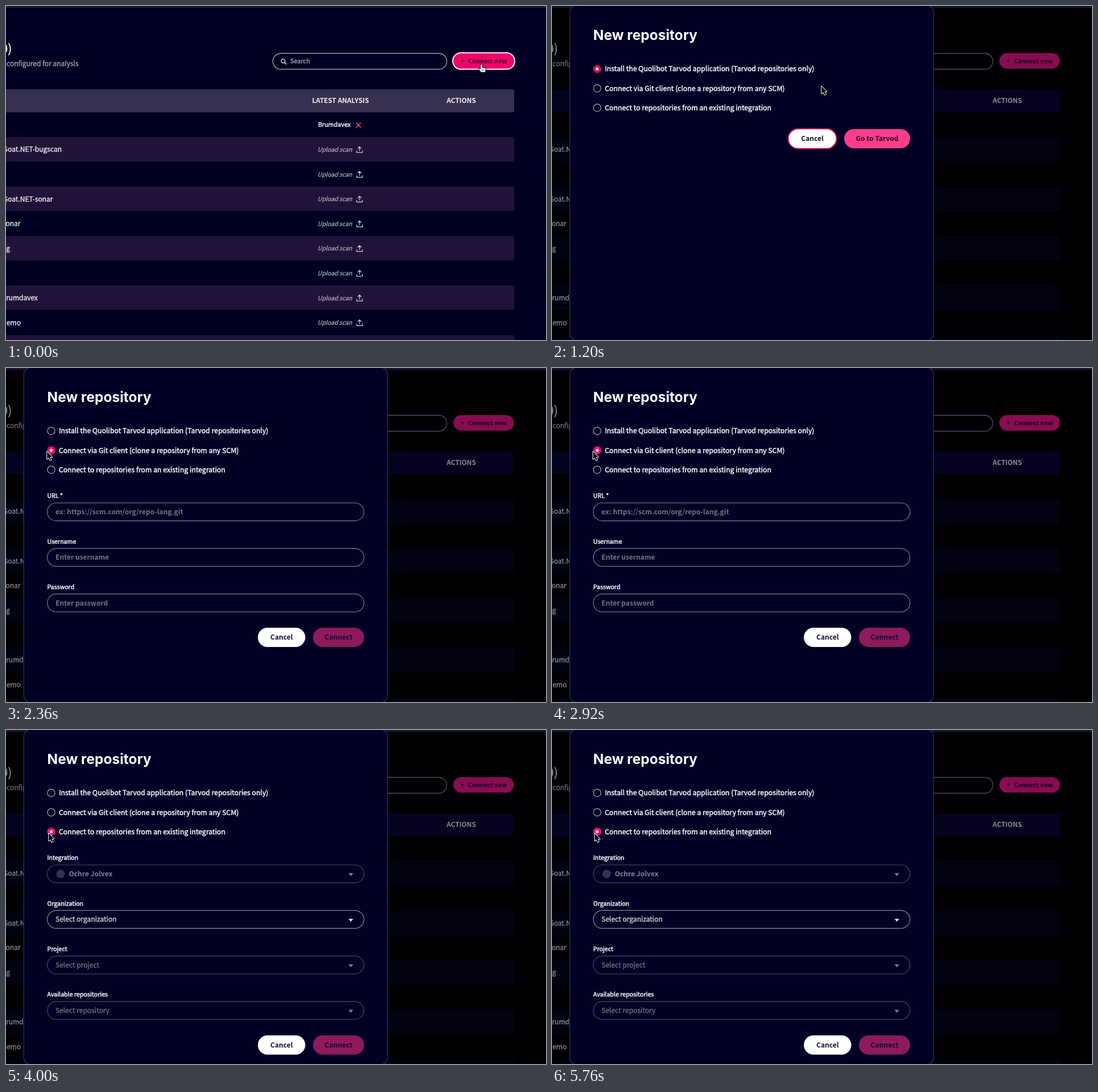
Write an HTML page with a canvas that moves like this. It is 950 px wide and 589 px high and loops after 6720 ms.

```html
<!DOCTYPE html>
<html lang="en">
<head>
<meta charset="utf-8">
<title>New repository</title>
<style>
html, body { margin: 0; width: 100%; height: 100%; overflow: hidden; background: #000023; }
canvas { display: block; width: 950px; height: 589px; }
</style>
</head>
<body>
<canvas id="stage" width="950" height="589"></canvas>
<script>
const ctx = document.getElementById('stage').getContext('2d');
const LOOP = 6720, STEP = 40;
const OPEN_AT = 280, GIT_AT = 2320, INTEGRATION_AT = 3840;
const SANS = '"Noto Sans CJK JP", "Noto Sans CJK SC", "Noto Sans CJK", "Open Sans", sans-serif';
const NAVY = '#010025';

const LIGHT = {
  bg: '#000023', strip: '#241638', header: '#383050', row: '#201239',
  title: '#f3f0f3', sub: '#aaa5ad', text: '#f0edf0', head: '#f5f2f5', field: '#a39c96'
};
const DIM = {
  bg: '#000002', strip: '#1d1233', header: '#04021e', row: '#020211',
  title: '#85838e', sub: '#6b6874', text: '#85838c', head: '#8d8b95', field: '#4d4a68'
};
const ROWS = [
  ['', 0], ['Goat.NET-bugscan', 98], ['', 0], ['Goat.NET-sonar', 82.5], ['sonar', 25.5],
  ['g', 7], ['', 0], ['Brumdavex', 56], ['demo', 26]
];
const OPTIONS = [
  'Install the Quolibot Tarvod application (Tarvod repositories only)',
  'Connect via Git client (clone a repository from any SCM)',
  'Connect to repositories from an existing integration'
];
// Pointer path: time, x, y
const PATH = [
  [560, 837, 102], [720, 775, 107], [960, 628, 126], [1200, 474, 141], [1440, 334, 149],
  [1680, 222, 154], [1920, 141, 157], [2160, 99, 156], [2320, 72, 147], [2960, 72, 147],
  [3200, 74, 147], [3560, 74, 147], [3680, 75, 163], [3800, 75, 182]
];

// y is the middle of the capital letters; a thin outline makes regular text a medium weight
function text(str, x, y, size, color, { weight = 400, align = 'left', style = '', family = SANS } = {}) {
  ctx.font = `${style} ${weight} ${size}px ${family}`;
  ctx.textAlign = align;
  ctx.fillStyle = ctx.strokeStyle = color;
  ctx.fillText(str, x, y + size * 0.365);
  if (weight < 600) {
    ctx.lineWidth = weight === 500 ? 0.5 : 0.35;
    ctx.lineJoin = 'round';
    ctx.strokeText(str, x, y + size * 0.365);
  }
}

function box(x, y, w, h, r, fill, stroke, lineWidth = 1.4) {
  ctx.beginPath();
  ctx.roundRect(x, y, w, h, r);
  paint(fill, stroke, lineWidth);
}

function disc(x, y, r, fill, stroke, lineWidth = 1.2) {
  ctx.beginPath();
  ctx.arc(x, y, r, 0, Math.PI * 2);
  paint(fill, stroke, lineWidth);
}

function paint(fill, stroke, lineWidth) {
  if (fill) { ctx.fillStyle = fill; ctx.fill(); }
  if (stroke) { ctx.strokeStyle = stroke; ctx.lineWidth = lineWidth; ctx.stroke(); }
}

function shape(d, x, y, fill, stroke, lineWidth = 1.2) {
  const path = new Path2D(d);
  ctx.save();
  ctx.translate(x, y);
  ctx.lineJoin = ctx.lineCap = 'round';
  if (stroke) { ctx.strokeStyle = stroke; ctx.lineWidth = lineWidth; ctx.stroke(path); }
  if (fill) { ctx.fillStyle = fill; ctx.fill(path); }
  ctx.restore();
}

function drawPage(c, open) {
  ctx.fillStyle = c.bg;
  ctx.fillRect(0, 0, 950, 589);
  ctx.fillStyle = c.strip;
  ctx.fillRect(0, 0, 950, 3.5);

  text('0)', 10.5, 75, 21.5, c.title, { align: 'right' });
  text('configured for analysis', 127.5, 102, 12, c.sub, { align: 'right' });

  box(469.5, 83.5, 306, 28, 14, null, c.field);
  disc(487.5, 97, 3.4, null, c.text);
  shape('M0 0L2.8 2.8', 490, 99.6, null, c.text, 1.4);
  text('Search', 500, 97.5, 10.9, c.sub);

  if (open) box(787, 83, 106.5, 27.5, 14, '#870c50');
  else box(786, 82.5, 109, 29, 14.5, '#f0046a', '#fff1f4', 2);
  const ink = open ? '#150222' : '#390025';
  text('+', 803, 97, 10.7, ink, { weight: 600, align: 'center' });
  text('Connect new', 813, 97, 10.7, ink, { weight: 600 });

  box(-10, 147, 904, 40.5, 4, c.header);
  text('LATEST ANALYSIS', 588.5, 167, 11.8, c.head, { weight: 600, align: 'center' });
  text('ACTIONS', 801, 167, 11.8, c.head, { weight: 600, align: 'center' });

  ROWS.forEach(([name, right], i) => {
    const y = 209.5 + i * 43.6;
    if (i % 2) box(-10, y - 21.8, 904, 43.2, 3, c.row);
    if (name) text(name, right, y, 12, c.text, { align: 'right' });
    if (i === 0) {
      text('Brumdavex', 549, y, 10.8, c.text, { weight: 500 });
      shape('M-4 -4L4 4M4 -4L-4 4', 620, 210.3, null, '#f2607c', 1.3);
    } else {
      text('Upload scan', 548, y, 10.6, '#aaa4ad', { style: 'italic' });
      shape('M0 1.8V-5.2M-3 -2.4L0 -5.4L3 -2.4M-5 1.8V5H5V1.8', 622, y + 0.4, null, '#e4e0e4', 1.2);
    }
  });
  box(-10, 580.2, 904, 30, 3, c.row);
}

function button(label, x, y, w, fill, ink) {
  box(x, y, w, 34, 17, fill);
  text(label, x + w / 2, y + 17, 12, ink, { weight: 600, align: 'center' });
}

function field(index, label, value, { ink = '#77747b', border = '#6f6a74', weight = 400, arrow, icon } = {}) {
  const y = 253.7 + index * 80.3;
  text(label, 72.5, y - 28.3, 10.65, '#f6f3f6', { weight: 500 });
  box(72.7, y - 15.8, 557, 31.6, 15.8, null, border);
  if (icon) disc(96, y, 7.5, '#34334f');
  text(value, icon ? 110.5 : 87, y, 12.05, ink, { weight });
  if (arrow) shape('M-4.2 -2.4H4.2L0 2.8Z', 606.7, y + 1.3, arrow);
}

function drawOptions(selected, hovered) {
  OPTIONS.forEach((label, i) => {
    const y = 111 + i * 34.2;
    if (i === selected) {
      disc(79.5, y, 7.2, hovered ? '#f5086a' : '#cf0b55');
      disc(79.5, y, 2.7, '#ffffff');
    } else {
      disc(79.5, y, 6.6, null, '#aaa5aa');
    }
    text(label, 93, y, 12.28, '#f6f3f6', { weight: 500 });
  });
}

function drawActions(y) {
  button('Cancel', 443, y, 83.5, '#ffffff', '#12102d');
  button('Connect', 540, y, 90, '#8d1a5b', '#1a0334');
}

function drawModal(t) {
  box(31.3, -1, 640, 591, 13, NAVY, '#3a2b52', 1.3);
  text('New repository', 72.5, 51, 24.5, '#ffffff', { weight: 700, family: 'Inter, sans-serif' });
  const selected = t >= INTEGRATION_AT ? 2 : t >= GIT_AT ? 1 : 0;
  drawOptions(selected, selected > 0);

  if (selected === 0) {
    box(415.5, 216.5, 85, 35, 17.5, '#ffffff', '#d3124f', 2);
    text('Cancel', 458, 234, 12, '#12102d', { weight: 600, align: 'center' });
    button('Go to Tarvod', 514, 217, 116, '#ff3d8b', '#1a0630');
  } else if (selected === 1) {
    field(0, 'URL *', 'ex: https://scm.com/org/repo-lang.git', { weight: 600 });
    field(1, 'Username', 'Enter username', { weight: 600 });
    field(2, 'Password', 'Enter password', { weight: 600 });
    drawActions(458);
  } else {
    const off = { ink: '#716e79', border: '#413d55', arrow: '#85818a' };
    field(0, 'Integration', 'Ochre Jolvex', { ...off, ink: '#85828a', weight: 600, icon: true });
    field(1, 'Organization', 'Select organization', { ink: '#c4bfc2', border: '#7d777e', weight: 500, arrow: '#e4e0e2' });
    field(2, 'Project', 'Select project', off);
    field(3, 'Available repositories', 'Select repository', off);
    drawActions(538.5);
  }
}

function pointerAt(t) {
  const next = PATH.findIndex(p => p[0] > t);
  if (next === 0) return PATH[0].slice(1);
  if (next < 0) return PATH[PATH.length - 1].slice(1);
  const [t0, x0, y0] = PATH[next - 1], [t1, x1, y1] = PATH[next];
  const k = (t - t0) / (t1 - t0);
  return [x0 + (x1 - x0) * k, y0 + (y1 - y0) * k];
}

function drawPointer(t) {
  if (t < OPEN_AT) {
    shape('M-2 6V-1Q-.8 -2.6 .5 -1V3.5L5.5 4.7Q7 5.3 6.8 7L5.6 11.5H-1.2L-5 6.7Q-4.8 4.8 -3.4 5.4Z',
      837, 105, '#ffffff', '#111111', 1.8);
    shape('M0 0V2.4M2 .3V2.6M4 .5V2.6', 837, 111.5, null, '#222222', 0.7);
  } else {
    const [x, y] = pointerAt(t);
    shape('M0 0V13L3 10.3L5.1 15.1L7.3 14.1L5.2 9.5H9Z', x + 0.3, y + 0.6, '#08080c', '#ffffff', 2);
  }
}

function frame(now) {
  const t = Math.floor((now % LOOP) / STEP) * STEP;
  const open = t >= OPEN_AT;
  drawPage(open ? DIM : LIGHT, open);
  if (open) drawModal(t);
  drawPointer(t);
  requestAnimationFrame(frame);
}
requestAnimationFrame(frame);
</script>
</body>
</html>
```
